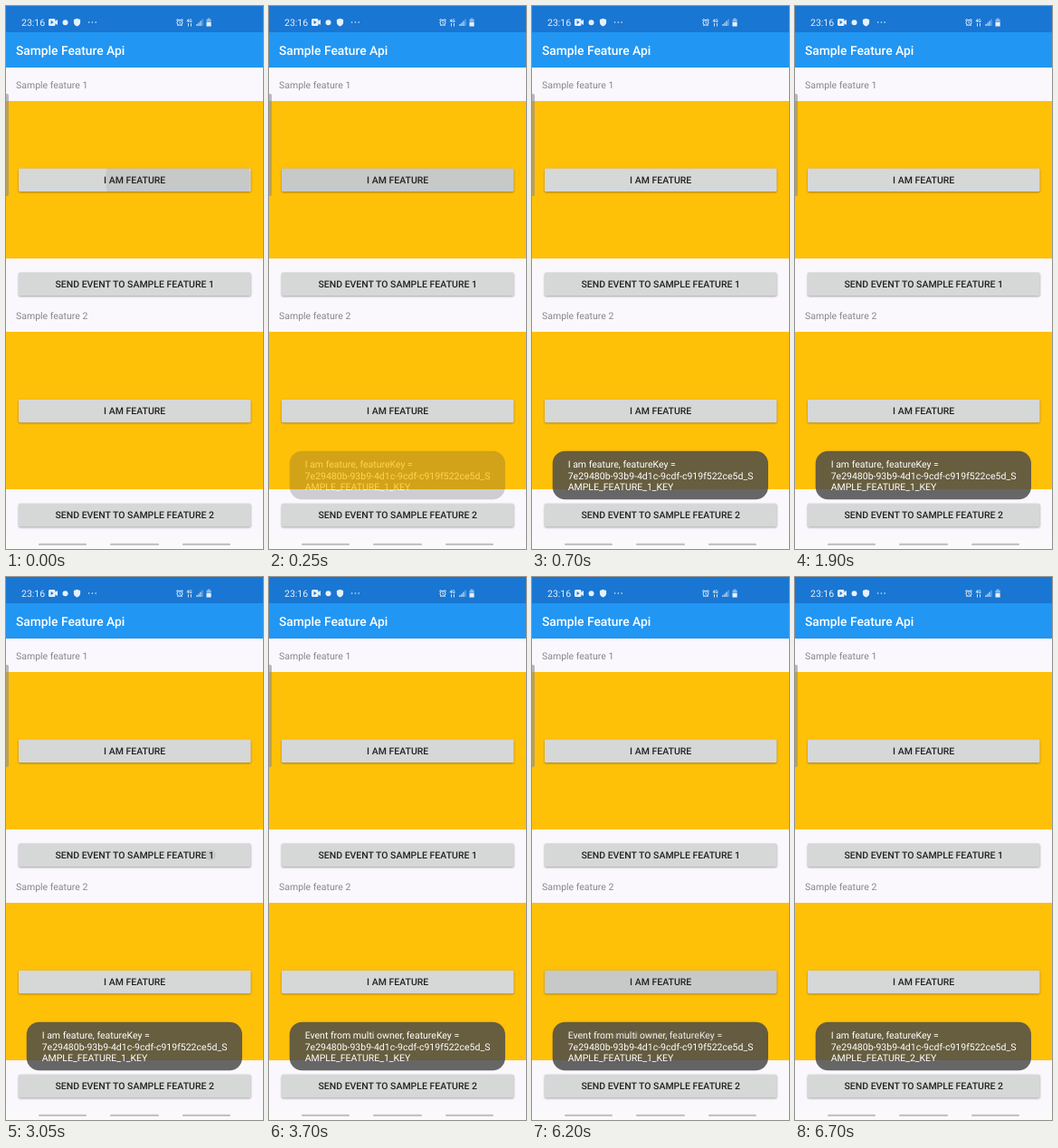
Animation of 284x600 px, one loop 8000 ms. Source, as an HTML page:

```html
<!DOCTYPE html>
<html lang="en">
<head>
<meta charset="utf-8">
<style>
  html, body { margin: 0; width: 100%; height: 100%; overflow: hidden; background: #faf8fd; }
  svg { display: block; }
  text { font: 10.5px Roboto, sans-serif; text-rendering: geometricPrecision; }
  .title { font-size: 13.8px; font-weight: 500; fill: #fff; }
  .label { fill: #88868a; }
  .button text { font-weight: 500; fill: #222; text-anchor: middle; }
  .toast text { fill: #fff; }
</style>
</head>
<body>
<svg id="stage" width="284" height="600" viewBox="0 0 284 600">
  <defs>
    <filter id="blur" x="-5%" y="-30%" width="110%" height="160%"><feGaussianBlur stdDeviation=".8"/></filter>
  </defs>
  <rect width="284" height="600" fill="#faf8fd"/>
  <rect width="284" height="29" fill="#1976d2"/>
  <rect y="29" width="284" height="39" fill="#2196f3"/>
  <text class="title" x="11" y="54">Sample Feature Api</text>

  <g id="status" fill="#e6f0fa">
    <text x="17" y="22">23:16</text>
    <rect x="47" y="14" width="7.5" height="8" rx="1.5"/>
    <path d="M54 17l3-2v6l-3-2z"/>
    <path d="M49.6 16l3 2-3 2z" fill="#1976d2"/>
    <circle cx="65.5" cy="18.2" r="3"/>
    <path d="M78.5 13.8l3.6 1.2v3c0 2-1.4 3.6-3.6 4.6-2.2-1-3.6-2.6-3.6-4.6v-3z"/>
    <circle cx="91.6" cy="18" r=".8"/><circle cx="95.4" cy="18" r=".8"/><circle cx="99.2" cy="18" r=".8"/>
    <g fill="none" stroke="#e6f0fa">
      <circle cx="192" cy="18.3" r="3"/>
      <path d="M192 16.5v2l1.3 1M188.3 16l2-2M195.7 16l-2-2M189.3 22l1-1M194.7 22l-1-1"/>
      <path d="M201.5 19v3.5M204.5 19v3.5" stroke-width=".9"/>
      <path d="M211 20v2M213 18.5v3.5M215 16.5v5.5" stroke-width="1.1"/>
      <path d="M217 14.5v7.5" stroke-width="1.1" opacity=".5"/>
    </g>
    <text x="199.5" y="17.8" style="font-size:5px;font-weight:700">4G</text>
    <path d="M222.8 13.5h2.6v1.3h1.3v3h-5.2v-3h1.3z" opacity=".55"/>
    <path d="M221.5 18h5.2v4.5h-5.2z"/>
  </g>

  <text class="label" x="11" y="90.5">Sample feature 1</text>
  <rect y="105" width="284" height="174" fill="#ffc008"/>
  <text class="label" x="11" y="345.8">Sample feature 2</text>
  <rect y="360" width="284" height="174" fill="#ffc008"/>
  <g id="buttons"></g>

  <path d="M0 97h1.5q1.5 0 1.5 2v109q0 2-1.5 2H0z" fill="#8c8c90" opacity=".6"/>
  <g id="toasts"></g>

  <rect y="590" width="284" height="10" fill="#fafafa"/>
  <g fill="#c3c2c6">
    <rect x="36" y="593.7" width="53" height="2.4" rx="1.2"/>
    <rect x="115" y="593.7" width="54" height="2.4" rx="1.2"/>
    <rect x="195" y="593.7" width="53" height="2.4" rx="1.2"/>
  </g>
</svg>
<script>
const LOOP = 8000, FADE = 500;
const LEFT = 14, WIDTH = 256.5, HEIGHT = 25.5;
const byId = id => document.getElementById(id);
const clamp = v => Math.min(1, Math.max(0, v));

const buttons = [
  [179.6, 'I AM FEATURE'],
  [294.6, 'SEND EVENT TO SAMPLE FEATURE 1'],
  [434.7, 'I AM FEATURE'],
  [549.8, 'SEND EVENT TO SAMPLE FEATURE 2']
];
// each press spreads a ripple, then shows a toast
const presses = [
  { button: 0, touch: 266, down: -138, show: 170, message: 'I am feature', key: 1 },
  { button: 1, touch: 230, down: 3040, show: 3170, message: 'Event from multi owner', key: 1 },
  { button: 2, touch: 230, down: 5940, show: 6170, message: 'I am feature', key: 2 }
];

byId('buttons').innerHTML = buttons.map(([y, label]) => `
  <g class="button">
    <rect x="${LEFT}" y="${y + 0.9}" width="${WIDTH}" height="${HEIGHT}" rx="1.5" opacity=".35" filter="url(#blur)"/>
    <rect x="${LEFT}" y="${y}" width="${WIDTH}" height="${HEIGHT}" rx="1.4" fill="#d6d7d7"/>
    <svg x="${LEFT}" y="${y}" width="${WIDTH}" height="${HEIGHT}"><circle cy="${HEIGHT / 2}" r="0"/></svg>
    <text x="142.2" y="${y + 16.6}">${label}</text>
  </g>`).join('');

byId('toasts').innerHTML = presses.map(p => `
  <g class="toast">
    <rect x="22.7" y="491.7" width="238.3" height="53.6" rx="14" fill="#4a4a4a" fill-opacity=".84"/>
    <text x="39.7" y="510.2">${p.message}, featureKey =</text>
    <text x="39.7" y="522.6">7e29480b-93b9-4d1c-9cdf-c919f522ce5d_S</text>
    <text x="39.7" y="535">AMPLE_FEATURE_${p.key}_KEY</text>
  </g>`).join('');

const ripples = document.querySelectorAll('.button circle');
const toasts = document.querySelectorAll('.toast');

function draw(t) {
  presses.forEach((p, i) => {
    const grow = clamp((t - p.down) / 225);
    const release = clamp((t - p.show - 80) / 250);
    const ripple = ripples[p.button];
    ripple.setAttribute('cx', p.touch + (142 - p.touch) * grow - LEFT);
    ripple.setAttribute('r', 130 * grow);
    ripple.setAttribute('opacity', 0.07 * (1 - release));

    const enter = clamp((t - p.show) / FADE);
    const next = presses[i + 1];
    const leave = next ? clamp((t - next.show) / FADE) : 0;
    toasts[i].setAttribute('opacity', (1 - (1 - enter) ** 2) * (1 - leave ** 2));
  });
}

let start;
function tick(now) {
  start ??= now;
  draw((now - start) % LOOP);
  requestAnimationFrame(tick);
}
draw(0);
requestAnimationFrame(tick);
</script>
</body>
</html>
```
